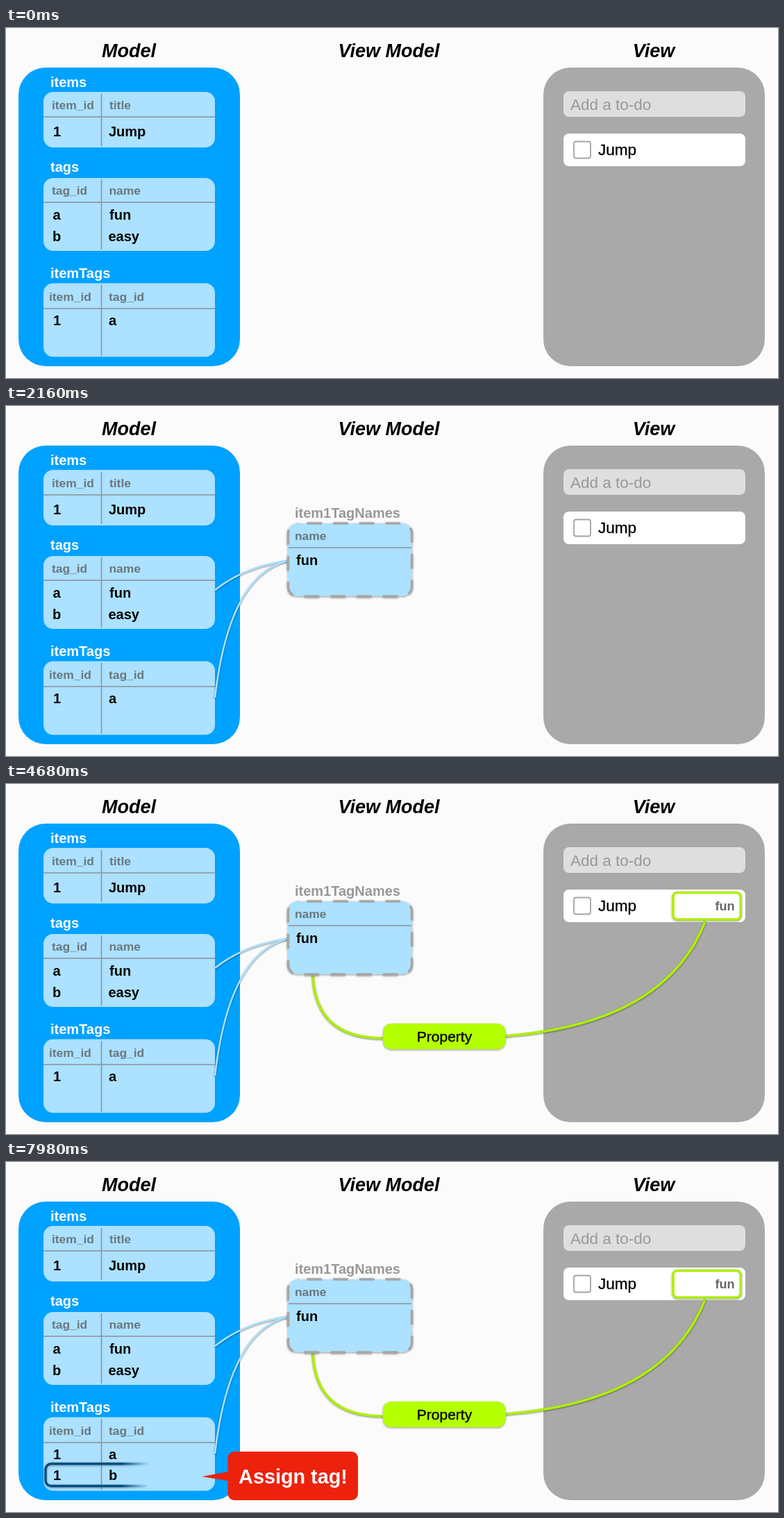
An HTML page that plays this animation: 1112 by 504 pixels, repeating every 8 s.

```html
<!DOCTYPE html>
<html lang="en">
<head>
<meta charset="utf-8">
<title>Model, View Model, View</title>
<style>
  html, body { margin: 0; width: 100%; height: 100%; overflow: hidden; background: #fbfbfb; }
  svg { display: block; width: 1112px; height: 504px; }
  text { font: bold 20px "Liberation Sans", Arial, sans-serif; }
  .title { font-size: 27px; font-style: italic; text-anchor: middle; }
  .name { fill: #fff; }
  .head { font-size: 17.4px; fill: #69777f; }
  .plain { font-size: 22.5px; font-weight: normal; }
  .medium { stroke: #000; stroke-width: .35px; }
  .cell { fill: #ace1ff; }
  .rule { stroke: #8a9399; stroke-width: 1.6; fill: none; }
  .wire { fill: none; stroke-dasharray: 1 2; filter: drop-shadow(0 1px 1px rgba(0, 0, 0, .45)); }
  .blue { stroke: #ace1ff; stroke-width: 2.6; }
  .green { stroke: #aef000; stroke-width: 3.6; }
  .raised { filter: drop-shadow(0 1.5px 1.5px rgba(0, 0, 0, .4)); }

  .wire, .anim { animation: 8s linear infinite both; }
  #joins path { animation-name: draw-joins; }
  #query { animation-name: show-query; }
  #toProperty { animation-name: draw-property; }
  #property { animation-name: show-property; }
  #toView { animation-name: draw-view; }
  #tagBox { animation-name: show-tag; }
  #callout { animation-name: pop; transform-origin: 414.5px 451.5px; }
  #newRow { animation-name: show-row; }
  #wipe { animation-name: wipe; }

  @keyframes draw-joins {
    0%, 6.25% { stroke-dashoffset: 1.02; }
    16.25%, 100% { stroke-dashoffset: 0; }
  }
  @keyframes show-query {
    0%, 16.5% { opacity: 0; }
    24%, 100% { opacity: 1; }
  }
  @keyframes draw-property {
    0%, 31% { stroke-dashoffset: 1.02; }
    36.75%, 100% { stroke-dashoffset: 0; }
  }
  @keyframes show-property {
    0%, 36.5% { opacity: 0; }
    42%, 100% { opacity: 1; }
  }
  @keyframes draw-view {
    0%, 43.75% { stroke-dashoffset: 1.02; }
    50.5%, 100% { stroke-dashoffset: 0; }
  }
  @keyframes show-tag {
    0%, 50.25% { opacity: 0; }
    56.25%, 100% { opacity: 1; }
  }
  @keyframes pop {
    0%, 71.25% { opacity: 0; transform: scale(1.17); }
    75.75%, 100% { opacity: 1; transform: none; }
  }
  @keyframes show-row {
    0%, 79.75% { opacity: 0; }
    86.5%, 100% { opacity: 1; }
  }
  @keyframes wipe {
    0%, 94.75% { transform: none; }
    100% { transform: translateX(157px); }
  }
</style>
</head>
<body>
<svg viewBox="0 0 1112 504">
  <defs>
    <linearGradient id="soft">
      <stop offset=".8" stop-color="#fff"/>
      <stop offset="1" stop-color="#fff" stop-opacity="0"/>
    </linearGradient>
    <mask id="reveal" maskUnits="userSpaceOnUse" x="0" y="420" width="320" height="60">
      <rect id="wipe" class="anim" x="-144" y="420" width="200" height="60" fill="url(#soft)"/>
    </mask>
  </defs>

  <text class="title" x="177" y="42">Model</text>
  <text class="title" x="551.5" y="42">View Model</text>
  <text class="title" x="933" y="42">View</text>

  <!-- Model -->
  <rect x="18" y="57" width="319" height="430" rx="39" fill="#00a2ff"/>
  <text class="name" x="64" y="85">items</text>
  <rect class="cell" x="54" y="92" width="247" height="80" rx="14"/>
  <path class="rule" d="M54 128H301M137.5 95V170"/>
  <text class="head" x="66" y="117">item_id</text>
  <text class="head" x="149" y="117">title</text>
  <text x="68" y="156">1</text>
  <text x="148" y="156">Jump</text>

  <text class="name" x="64" y="207">tags</text>
  <rect class="cell" x="54" y="216" width="247" height="105" rx="14"/>
  <path class="rule" d="M54 251H301M137.5 218V319"/>
  <text class="head" x="66" y="240">tag_id</text>
  <text class="head" x="148.5" y="240">name</text>
  <text x="67.5" y="276">a</text>
  <text x="149" y="276">fun</text>
  <text x="67" y="307">b</text>
  <text x="147.5" y="307">easy</text>

  <text class="name" x="64" y="360">itemTags</text>
  <rect class="cell" x="54" y="367.5" width="247" height="106" rx="14"/>
  <path class="rule" d="M54 404H301M137.5 370V472"/>
  <text class="head" x="62" y="393">item_id</text>
  <text class="head" x="148" y="393">tag_id</text>
  <text x="68" y="428">1</text>
  <text x="148" y="428">a</text>
  <g id="newRow" class="anim">
    <text x="68" y="458">1</text>
    <text x="148" y="458">b</text>
  </g>

  <!-- View -->
  <rect x="774" y="57" width="319" height="430" rx="39" fill="#a9a9a9"/>
  <rect x="803" y="91" width="262" height="37" rx="8" fill="#dedede"/>
  <text class="plain" x="813" y="118" fill="#989898">Add a to-do</text>
  <rect x="803" y="152" width="262" height="47" rx="8" fill="#fff"/>
  <rect x="818" y="163.5" width="24" height="24" rx="3" fill="#fff" stroke="#a4a4a4" stroke-width="1.8"/>
  <text class="plain medium" x="853" y="183">Jump</text>

  <!-- View Model -->
  <g id="joins">
    <path class="wire blue" pathLength="1" d="M301 265Q345 230 411 222"/>
    <path class="wire blue" pathLength="1" d="M301 420Q322 238 411 222"/>
  </g>
  <path id="toProperty" class="wire green" pathLength="1" d="M442 274Q445 366 543 366"/>
  <g id="query" class="anim">
    <text x="416" y="161" fill="#989898">item1TagNames</text>
    <g class="raised">
      <rect class="cell" x="406" y="169" width="179" height="105" rx="14"/>
      <rect x="406.5" y="169" width="178" height="105" rx="14" fill="none" stroke="#a6a6a6"
        stroke-width="3.5" stroke-dasharray="21.5 16.2" stroke-dashoffset="-13"/>
    </g>
    <path class="rule" d="M407 204H584"/>
    <text class="head" x="416" y="193">name</text>
    <text x="418" y="229">fun</text>
  </g>
  <path id="toView" class="wire green" pathLength="1" d="M719 363Q950 345 1007 198"/>
  <g id="property" class="anim">
    <rect class="raised" x="543" y="345" width="176.5" height="37" rx="12" fill="#b4ff00"/>
    <text class="plain medium" x="631.5" y="371" text-anchor="middle" style="font-size:21px">Property</text>
  </g>
  <g id="tagBox" class="anim">
    <rect class="raised" x="961" y="156.5" width="97" height="38.5" rx="6" fill="#fff" stroke="#aef000" stroke-width="3.6"/>
    <text x="1049.5" y="182" text-anchor="end" fill="#666" style="font-size:18px">fun</text>
  </g>

  <!-- New assignment -->
  <g mask="url(#reveal)">
    <rect class="raised" x="57" y="434.5" width="241" height="32" rx="8" fill="none" stroke="#004d80" stroke-width="3.4"/>
  </g>
  <g id="callout" class="anim">
    <path d="M282 453L319.500 446V426a9 9 0 0 1 9-9H498a9 9 0 0 1 9 9V478a9 9 0 0 1-9 9H328.500a9 9 0 0 1-9-9V459Z" fill="#ed220d"/>
    <text x="413.500" y="463" text-anchor="middle" fill="#fff" style="font-size:28.800px">Assign tag!</text>
  </g>
</svg>
</body>
</html>
```
